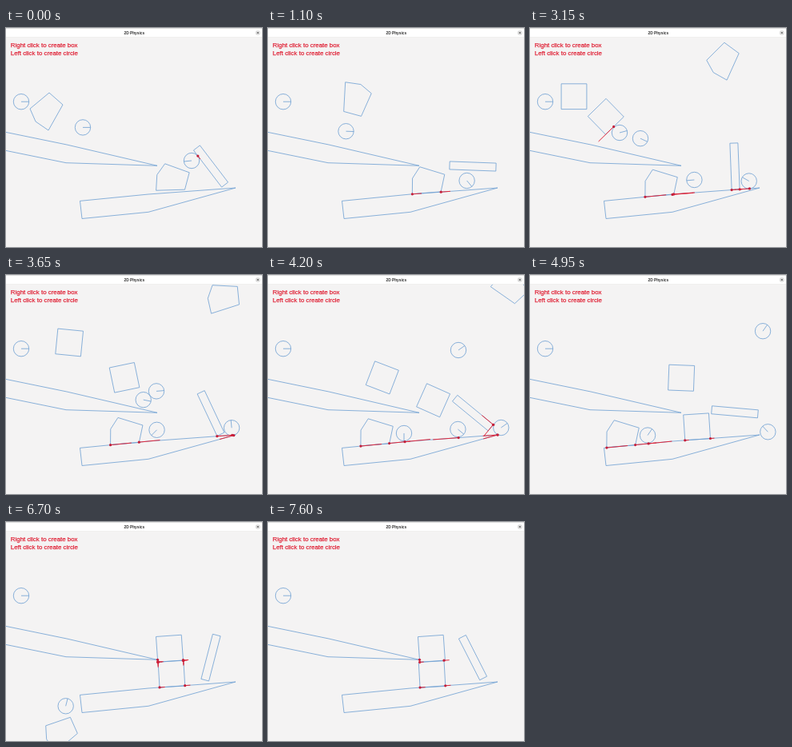
Recreate the animation shown at these times as an HTML page with a canvas. Size 320 by 274 pixels, loop 7.65 s.

```html
<!DOCTYPE html>
<html lang="en">
<head>
<meta charset="utf-8">
<title>2D Physics</title>
<style>
html, body { margin: 0; width: 100%; height: 100%; overflow: hidden; background: #f4f3f3; }
canvas { display: block; width: 320px; height: 274px; }
</style>
</head>
<body>
<canvas id="stage"></canvas>
<script>
const W = 320, H = 274, LOOP = 7.65, G = 700, R = 9.7;
const BLUE = '#6c9fd2', RED = '#e0263a', DOT = '#c41f3a';
const canvas = document.getElementById('stage');
const ctx = canvas.getContext('2d');
const dpr = window.devicePixelRatio || 1;
canvas.width = W * dpr;
canvas.height = H * dpr;

const ramps = [
  [[-2, 130], [76, 146], [189, 172.3], [75, 168.7], [-2, 153]],
  [[92.5, 216.4], [178, 208], [287, 200], [178, 230.3], [95, 238.5]]
];

const rect = (w, h) => [[-w, -h], [w, -h], [w, h], [-w, h]];
const square = rect(15.9, 15.9);
const kite = [[22, -8.6], [4, 23.4], [-12, 12.4], [-19, -3.6], [5, -23.6]];
const house = [[-7.8, -17.5], [23.2, -8], [18.6, 13.6], [-17.2, 16.4], [-17, -3.2]];

const clamp01 = u => Math.max(0, Math.min(1, u));
const rad = deg => deg * Math.PI / 180;

// Key: time, x, y, degrees, number of hops on the way to the next key
function along(keys) {
  return t => {
    const i = keys.findIndex(k => k[0] > t);
    if (i < 1) return null;
    const a = keys[i - 1], b = keys[i], hops = a[4] || 0;
    const dt = b[0] - a[0], u = (t - a[0]) / dt;
    const mix = n => a[n] + (b[n] - a[n]) * u;
    const h = u * hops % 1;
    const lift = hops ? G / 2 * (dt / hops) ** 2 * h * (1 - h) : 0;
    return { x: mix(1), y: mix(2) - lift, a: rad(mix(3)) };
  };
}

function spin(t) {
  return { x: 256, y: 173 - 3.4 * clamp01((t - 4) / 1.9), a: rad(52.7 - 46 * t) };
}

// Drops onto the ramp, slides down it, then tips over its end
function slide(t) {
  const x = t < 2.15 ? 205.6 - 6.2 * t - t * t : 187.8 - 26.7 * (t - 2.15);
  const drop = 2.8 * clamp01(1 - t), fall = Math.max(0, t - 5.9);
  return { x, y: 191.2 + (198 - x) * 0.0945 - drop + 95 * fall * fall, a: rad(drop - 45 * fall) };
}

const body = (shape, pose) => ({ shape, pose });
const ball = (...keys) => body(null, along(keys));

const bodies = [
  body(rect(29, 5), spin),
  body(house, slide),
  body(kite, along([[0, 49, 104.6, 0], [1.1, 110.6, 87, 153.8], [2.15, 181, 70, 259], [4.2, 302, 13, 455.6], [5, 352, -13, 531]])),
  body(square, along([[2.35, 55, 85.7, 0, 1], [2.65, 56, 121, 0, 1], [3.15, 94.8, 110.8, 45.7, 2], [4.2, 206.6, 156.8, 114, 1], [4.6, 208.6, 189.8, 86.3], [5.9, 208.6, 189.8, 86.3], [8, 204.2, 190.6, 87]])),
  body(square, along([[3.15, 55, 85.7, 0, 1], [3.45, 56, 121, 0, 1], [4.2, 142.8, 128.4, 21, 2], [5.2, 204.6, 158, -4], [8, 204.4, 158.4, -4]])),
  body(null, () => ({ x: 19, y: 92.2, a: 0 })),
  ball([0, 232, 166, 174], [0.55, 289, 189, 320, 1], [0.9, 325, 290, 400]),
  ball([0, 96, 124.4, 0, 1], [0.15, 97, 141, 0, 2], [1.1, 248.6, 191, 50], [2.15, 257, 192, 100], [4.2, 291.3, 191, 325, 1], [4.75, 310, 290, 380]),
  ball([1, 97, 124.4, 0, 1], [1.2, 98, 141, 4, 2], [2.15, 198, 143.2, 30, 2], [3.15, 205.4, 190, 175], [4.2, 170, 198, 90], [5.9, 118, 203.8, -240], [6.5, 88, 206, -400, 1], [6.95, 58, 300, -480]),
  ball([1.75, 62, 133, 0, 1], [2.15, 102.2, 139.8, 25, 2], [3.15, 138, 138.2, 25, 2], [4, 223, 166, -25, 1], [4.2, 238, 94, -35, 1], [5.5, 330, 303, -70]),
  ball([1.85, 80, 100, 0, 1], [2.15, 85, 119.2, 5, 2], [3.15, 112, 131, -15, 2], [4.2, 237.4, 193, 40], [4.8, 287, 190, 200, 1], [5.35, 325, 290, 300])
];

function outline(points) {
  ctx.beginPath();
  points.forEach(p => ctx.lineTo(p[0], p[1]));
  ctx.closePath();
  ctx.stroke();
}

function line(x1, y1, x2, y2) {
  ctx.beginPath();
  ctx.moveTo(x1, y1);
  ctx.lineTo(x2, y2);
  ctx.stroke();
}

function disc(x, y, r, fill) {
  ctx.beginPath();
  ctx.arc(x, y, r, 0, Math.PI * 2);
  if (!fill) return ctx.stroke();
  ctx.fillStyle = fill;
  ctx.fill();
}

function place(b, t) {
  const p = b.pose(t);
  if (!p) return null;
  const before = b.pose(t - 0.05) || p;
  const c = Math.cos(p.a), s = Math.sin(p.a);
  const points = b.shape && b.shape.map(([x, y]) => [p.x + x * c - y * s, p.y + x * s + y * c]);
  return { ...p, points, vx: (p.x - before.x) / 0.05 };
}

function drawBody(b) {
  if (b.points) return outline(b.points);
  disc(b.x, b.y, R);
  line(b.x, b.y, b.x + R * Math.cos(b.a), b.y + R * Math.sin(b.a));
}

// A dot where a corner or rim meets an edge, with a friction line along that edge
function touch([px, py], r, edges, vx) {
  edges.forEach((a, i) => {
    const b = edges[(i + 1) % edges.length];
    const ex = b[0] - a[0], ey = b[1] - a[1], len = Math.hypot(ex, ey);
    const u = clamp01(((px - a[0]) * ex + (py - a[1]) * ey) / (len * len));
    const x = a[0] + ex * u, y = a[1] + ey * u;
    if (Math.abs(Math.hypot(px - x, py - y) - r) > 1.1) return;
    const pull = (vx > 3 ? -1 : 1) * Math.sign(ex || 1) * Math.min(32, 5 + Math.abs(vx) * 0.8) / len;
    line(x, y, x + ex * pull, y + ey * pull);
    disc(x, y, 1.6, DOT);
  });
}

function drawContacts(live) {
  const solids = [...ramps.map(points => ({ points, vx: 0 })), ...live.filter(b => b.points)];
  for (const s of solids) {
    for (const b of live) {
      if (b === s) continue;
      if (b.points) b.points.forEach(p => touch(p, 0, s.points, b.vx));
      else touch([b.x, b.y], R, s.points, b.vx);
    }
  }
  for (const b of live.filter(b => b.points)) {
    for (const r of ramps) r.forEach(p => touch(p, 0, b.points, b.vx));
  }
}

function drawWindow() {
  ctx.fillStyle = '#ffffff';
  ctx.fillRect(0, 0, W, 11.5);
  ctx.fillStyle = '#c8c8c8';
  ctx.fillRect(0, 0, W, 0.6);
  ctx.fillStyle = '#ebebea';
  ctx.fillRect(0, 11.2, W, 0.6);
  ctx.fillStyle = '#303030';
  ctx.font = 'bold 4.8px "Liberation Sans", sans-serif';
  ctx.textAlign = 'center';
  ctx.fillText('2D Physics', 160.3, 7.9);
  disc(314.8, 6, 3.1, '#e3e3e3');
  ctx.strokeStyle = '#404040';
  ctx.lineWidth = 0.7;
  line(313.7, 4.9, 315.9, 7.1);
  line(315.9, 4.9, 313.7, 7.1);
}

function drawHelp(text, y) {
  ctx.fillText(text, 5.8, y);
  ctx.strokeText(text, 5.8, y);
}

function draw(t) {
  ctx.setTransform(dpr, 0, 0, dpr, 0, 0);
  ctx.fillStyle = '#f4f3f3';
  ctx.fillRect(0, 0, W, H);
  ctx.lineJoin = 'round';
  ctx.lineWidth = 0.8;
  ctx.strokeStyle = BLUE;
  ramps.forEach(outline);
  const live = bodies.map(b => place(b, t)).filter(Boolean);
  live.forEach(drawBody);

  ctx.strokeStyle = RED;
  ctx.lineWidth = 1;
  drawContacts(live);

  ctx.fillStyle = RED;
  ctx.lineWidth = 0.25;
  ctx.textAlign = 'left';
  ctx.font = '7.9px "Liberation Sans", sans-serif';
  drawHelp('Right click to create box', 24.3);
  drawHelp('Left click to create circle', 33.8);
  drawWindow();
}

const start = performance.now();
function frame() {
  const t = ((performance.now() - start) / 1000) % LOOP;
  draw(Math.floor(t * 20 + 0.001) / 20);
  requestAnimationFrame(frame);
}
draw(0);
requestAnimationFrame(frame);
</script>
</body>
</html>
```
